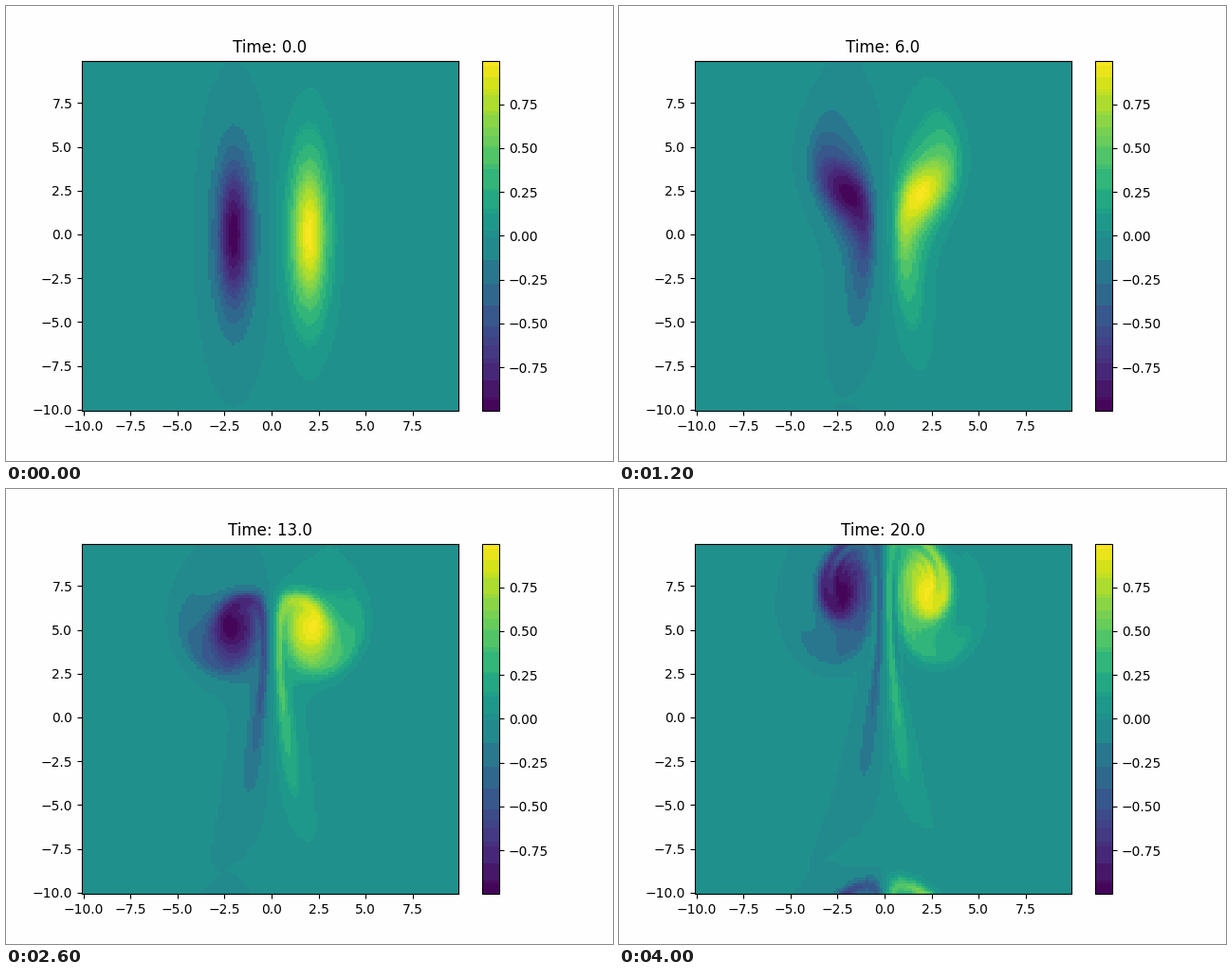
These frames come from a looping animation (640 by 480 pixels, 4200 ms). A matplotlib script:

```python
import numpy as np
import matplotlib.pyplot as plt
from matplotlib.animation import FuncAnimation
from matplotlib.colors import ListedColormap

N, SIZE = 128, 20.0
FRAMES, INTERVAL = 21, 200
VISCOSITY, STEPS = 0.001, 10  # Runge-Kutta steps per unit of time

H = SIZE / N
x = -SIZE / 2 + H * np.arange(N)
X, Y = np.meshgrid(x, x)

k = 2 * np.pi * np.fft.fftfreq(N, H)
K2 = k[:, None] ** 2 + k[None, : N // 2 + 1] ** 2
K2[0, 0] = 1.0


def diff(f, axis):
    return (np.roll(f, -1, axis) - np.roll(f, 1, axis)) / (2 * H)


def laplacian(f):
    neighbours = sum(np.roll(f, s, a) for s in (-1, 1) for a in (0, 1))
    return (neighbours - 4 * f) / H**2


def rate(w):
    """Time derivative of the vorticity on the periodic square."""
    psi = np.fft.irfft2(-np.fft.rfft2(w) / K2, s=w.shape)
    advection = diff(psi, 1) * diff(w, 0) - diff(psi, 0) * diff(w, 1)
    return advection + VISCOSITY * laplacian(w)


def advance(w):
    dt = 1.0 / STEPS
    for _ in range(STEPS):
        a = rate(w)
        b = rate(w + dt / 2 * a)
        c = rate(w + dt / 2 * b)
        d = rate(w + dt * c)
        w = w + dt / 6 * (a + 2 * b + 2 * c + d)
    return w


def vortex(cx):
    return np.exp(-((X - cx) ** 2) - Y**2 / 20)


fields = [vortex(2) - vortex(-2)]
while len(fields) < FRAMES:
    fields.append(advance(fields[-1]))
VMIN, VMAX = fields[0].min(), fields[0].max()

# Viridis is banded by grouping its colours into 32 x 16 x 32 RGB boxes.
VIRIDIS = np.rint(np.array(plt.get_cmap("viridis").colors) * 255).astype(int)
BOXES = np.unique(VIRIDIS // [32, 16, 32], axis=0, return_inverse=True)[1].ravel()


def banded_cmap(w):
    """Give each band the mean of its colours, weighted by visible area."""
    index = np.clip((w - VMIN) / (VMAX - VMIN) * 256, 0, 255).astype(int)
    area = 9 * np.bincount(index.ravel(), minlength=256) + 26
    total = np.bincount(BOXES, area)
    means = [np.bincount(BOXES, area * VIRIDIS[:, c]) / total for c in range(3)]
    return ListedColormap(np.floor(np.stack(means, 1))[BOXES] / 255)


fig, ax = plt.subplots(figsize=(6.4, 4.8), dpi=100, facecolor="#fefefe")
mesh = ax.pcolormesh(X, Y, fields[0], shading="nearest", vmin=VMIN, vmax=VMAX)
fig.colorbar(mesh, ax=ax)
title = ax.set_title("Time: 0.0")


def update(i):
    mesh.set_array(fields[i])
    mesh.set_cmap(banded_cmap(fields[i]))
    title.set_text(f"Time: {i:.1f}")
    return mesh, title


anim = FuncAnimation(fig, update, frames=FRAMES, interval=INTERVAL, repeat=True)
plt.show()
```
